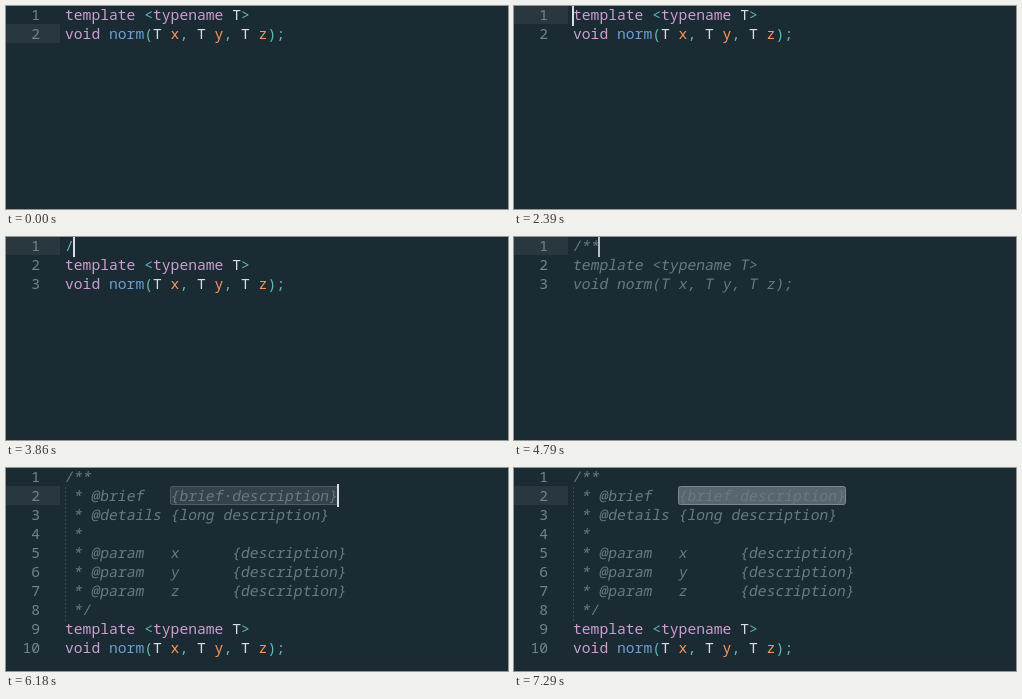
Write an HTML page with a canvas that moves like this. It is 502x203 px and loops after 7370 ms.

```html
<!DOCTYPE html>
<html lang="en">
<head>
<meta charset="utf-8">
<style>
  html, body { margin: 0; width: 100%; height: 100%; overflow: hidden; background: #1b2b34; }
  canvas { display: block; }
</style>
</head>
<body>
<canvas id="stage" width="502" height="203"></canvas>
<script>
const ctx = document.getElementById("stage").getContext("2d");
const LOOP = 7370, LEFT = 59, CHAR = 8.8, ROW = 19, BASE = 14;
const COMMENT = "#6a7983", NUMBER = "#74838d", PUNCTUATION = "#5fb9b9", TYPE = "#d8dee9";
const KEYWORD = "#cf9dcf", FUNCTION = "#6aa0d4", PARAM = "#fb9659";
const COLORS = {
  template: KEYWORD, typename: KEYWORD, void: KEYWORD,
  norm: FUNCTION, T: TYPE, x: PARAM, y: PARAM, z: PARAM
};

const code = ["template <typename T>", "void norm(T x, T y, T z);"];
const docBlock = [
  "/**",
  " * @brief   {brief·description}",
  " * @details {long description}",
  " *",
  ...[..."xyz"].map(p => ` * @param   ${p}      {description}`),
  " */"
];

const keys = [
  [840, "End"], [1690, "Home"], [2390, "Up"], [2840, "Enter"], [3390, "Up"],
  [3860, "/"], [4240, "*"], [4410, "*"], [4870, "Tab"], [7290, "Select"]
];

const actions = {
  End: s => { s.col = s.lines[s.row].length; },
  Home: s => { s.col = 0; },
  Up: s => { s.row--; },
  Enter: s => { s.lines.splice(s.row++, 0, ""); },
  Tab: s => {
    s.lines.splice(0, 1, ...docBlock);
    s.row = 1;
    s.col = docBlock[1].length;
    s.expanded = true;
  },
  Select: s => { s.selected = true; s.caret = false; }
};

function type(s, ch) {
  s.lines[s.row] += ch;
  s.col++;
}

function editorAt(t) {
  const s = { lines: [...code], row: 1, col: 0, caret: false, lastKey: 0 };
  for (const [time, key] of keys) {
    if (time > t) break;
    s.caret = true;
    s.lastKey = time;
    actions[key] ? actions[key](s) : type(s, key);
  }
  return s;
}

// Smooth blink that restarts fully lit after each key
function caretAlpha(age) {
  const phase = age % 1045;
  const ramp = from => Math.min(1, Math.max(0, (phase - from) / 170));
  const fadeIn = age < 1045 ? 1 : ramp(0);
  return Math.min(fadeIn, 1 - ramp(350));
}

function put(text, x, row, color, slant = 0) {
  ctx.fillStyle = color;
  [...text].forEach((ch, i) => {
    ctx.setTransform(1, 0, -slant, 1, x + i * CHAR, row * ROW + BASE);
    ctx.fillText(ch, 0, 0);
  });
  ctx.resetTransform();
}

function drawCode(text, row) {
  for (const m of text.matchAll(/\w+|[^\w\s]+/g))
    put(m[0], LEFT + m.index * CHAR, row, COLORS[m[0]] || PUNCTUATION);
}

function drawLines(lines) {
  let inComment = false;
  ctx.font = "500 14.667px 'Noto Sans Mono', monospace";
  lines.forEach((line, row) => {
    const number = String(row + 1);
    put(number, 34 - number.length * CHAR, row, NUMBER);
    inComment ||= line.startsWith("/*");
    if (inComment) put(line, LEFT - .7, row, COMMENT, .18);
    else drawCode(line, row);
    if (line.endsWith("*/")) inComment = false;
  });
}

function drawField(selected) {
  ctx.beginPath();
  ctx.roundRect(164.5, 18.5, 167, 18, 2);
  ctx.fillStyle = selected ? "#586670" : "#33424b";
  ctx.strokeStyle = selected ? "#7b8790" : "#4f5d66";
  ctx.fill();
  ctx.stroke();
}

function drawGuide() {
  ctx.fillStyle = "#3b4b54";
  for (let y = ROW; y < 8 * ROW; y += 4) ctx.fillRect(LEFT, y, 1, 2);
}

function draw(t) {
  const { lines, row, col, caret, lastKey, expanded, selected } = editorAt(t);

  ctx.fillStyle = "#1b2b34";
  ctx.fillRect(0, 0, 502, 203);
  ctx.fillStyle = "#29383f";
  ctx.fillRect(0, row * ROW - 1, 54, ROW);

  if (expanded) {
    drawGuide();
    drawField(selected);
  }
  drawLines(lines);

  if (caret) {
    ctx.globalAlpha = caretAlpha(t - lastKey);
    ctx.fillStyle = TYPE;
    ctx.fillRect(Math.round(LEFT + col * CHAR) - 1, row * ROW - 3, 2, 23);
    ctx.globalAlpha = 1;
  }
}

function tick() {
  draw(performance.now() % LOOP);
  requestAnimationFrame(tick);
}
tick();
</script>
</body>
</html>
```
